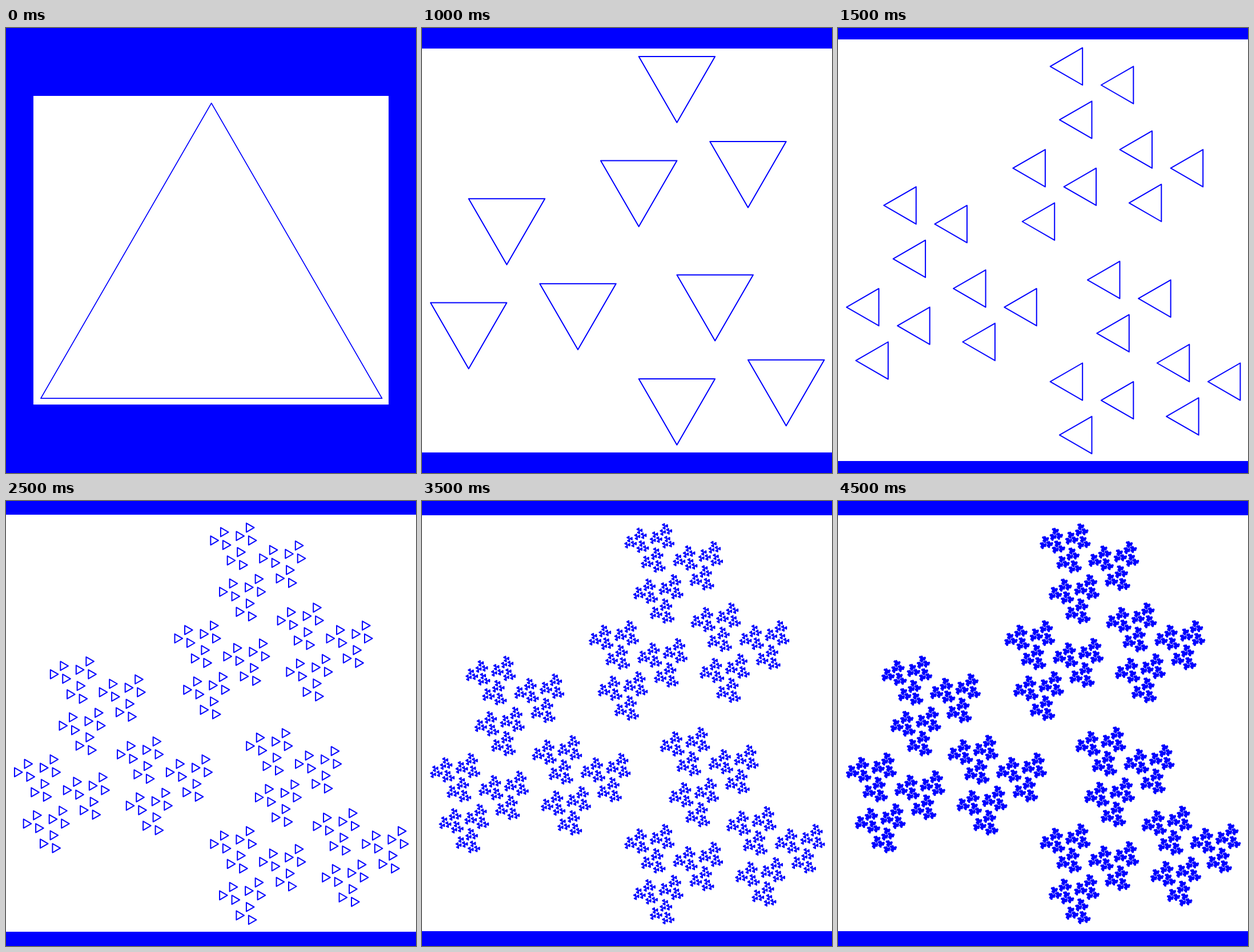
An HTML page with a canvas for the animation above (5 s loop, 718 by 780 pixels).

```html
<!DOCTYPE html>
<html lang="en">
<head>
<meta charset="utf-8">
<title>Triangle fractal</title>
<style>
  html, body { margin: 0; width: 100%; height: 100%; overflow: hidden; }
  canvas { display: block; }
</style>
</head>
<body>
<canvas id="stage" width="718" height="780"></canvas>
<script>
const WIDTH = 718, HEIGHT = 780, BLUE = '#0000ff', LOOP = 5000;
const DEG = Math.PI / 180;

// Each step: start time, recursion depth, top and bottom of the white panel.
const STEPS = [
  { start: 0, depth: 0, top: 119, bottom: 660, left: 48, right: 670, span: 597.5, lineWidth: 1.75 },
  { start: 500, depth: 1, top: 0, bottom: 780 },
  { start: 1000, depth: 2, top: 36, bottom: 744 },
  { start: 1500, depth: 3, top: 20, bottom: 759 },
  { start: 2000, depth: 4, top: 28, bottom: 752 },
  { start: 2500, depth: 5, top: 24, bottom: 755 },
  { start: 3500, depth: 7, top: 25, bottom: 754 },
  { start: 4000, depth: 8, top: 25, bottom: 754 },
  { start: 4500, depth: 9, top: 25, bottom: 754 }
];

// Three corners of an equilateral triangle; angles run counter-clockwise.
function corners([x, y], radius, degrees) {
  return [0, 120, 240].map(turn => {
    const angle = (degrees + turn) * DEG;
    return [x + radius * Math.cos(angle), y - radius * Math.sin(angle)];
  });
}

// Every level halves the size and turns it by 30 degrees.
function buildTriangles(depth) {
  const tilt = Math.atan2(0.25, 1 + Math.sqrt(3) / 4) / DEG;
  const spread = Math.hypot(0.25, 1 + Math.sqrt(3) / 4) / 2;
  let centers = [[0, 0]];
  for (let level = 0; level < depth; level++) {
    centers = centers.flatMap(c => corners(c, spread / 2 ** level, 60 + tilt + 30 * level));
  }
  return centers.map(c => corners(c, 1 / 2 ** depth, 90 + 30 * depth));
}

function range(values) {
  let min = Infinity, max = -Infinity;
  for (const v of values) {
    min = Math.min(min, v);
    max = Math.max(max, v);
  }
  return { size: max - min, middle: (min + max) / 2 };
}

function render({ depth, top, bottom, left = 0, right = WIDTH, span = 689.5, lineWidth = 2 }) {
  const canvas = document.createElement('canvas');
  canvas.width = WIDTH;
  canvas.height = HEIGHT;
  const ctx = canvas.getContext('2d');
  ctx.fillStyle = BLUE;
  ctx.fillRect(0, 0, WIDTH, HEIGHT);
  ctx.fillStyle = '#fff';
  ctx.fillRect(left, top, right - left, bottom - top);

  const triangles = buildTriangles(depth);
  const points = triangles.flat();
  const xs = range(points.map(p => p[0]));
  const ys = range(points.map(p => p[1]));
  const scale = span / xs.size;
  ctx.strokeStyle = BLUE;
  ctx.lineWidth = lineWidth;
  ctx.lineJoin = 'round';
  for (const triangle of triangles) {
    ctx.beginPath();
    for (const [x, y] of triangle) {
      ctx.lineTo(359.7 + (x - xs.middle) * scale, 390.4 + (y - ys.middle) * scale);
    }
    ctx.closePath();
    ctx.stroke();
  }
  return canvas;
}

const stage = document.getElementById('stage').getContext('2d');
const pictures = STEPS.map(render);
let shown = -1;

function draw() {
  const time = performance.now() % LOOP;
  const current = STEPS.filter(step => step.start <= time).length - 1;
  if (current !== shown) {
    stage.drawImage(pictures[current], 0, 0);
    shown = current;
  }
  requestAnimationFrame(draw);
}
draw();
</script>
</body>
</html>
```
